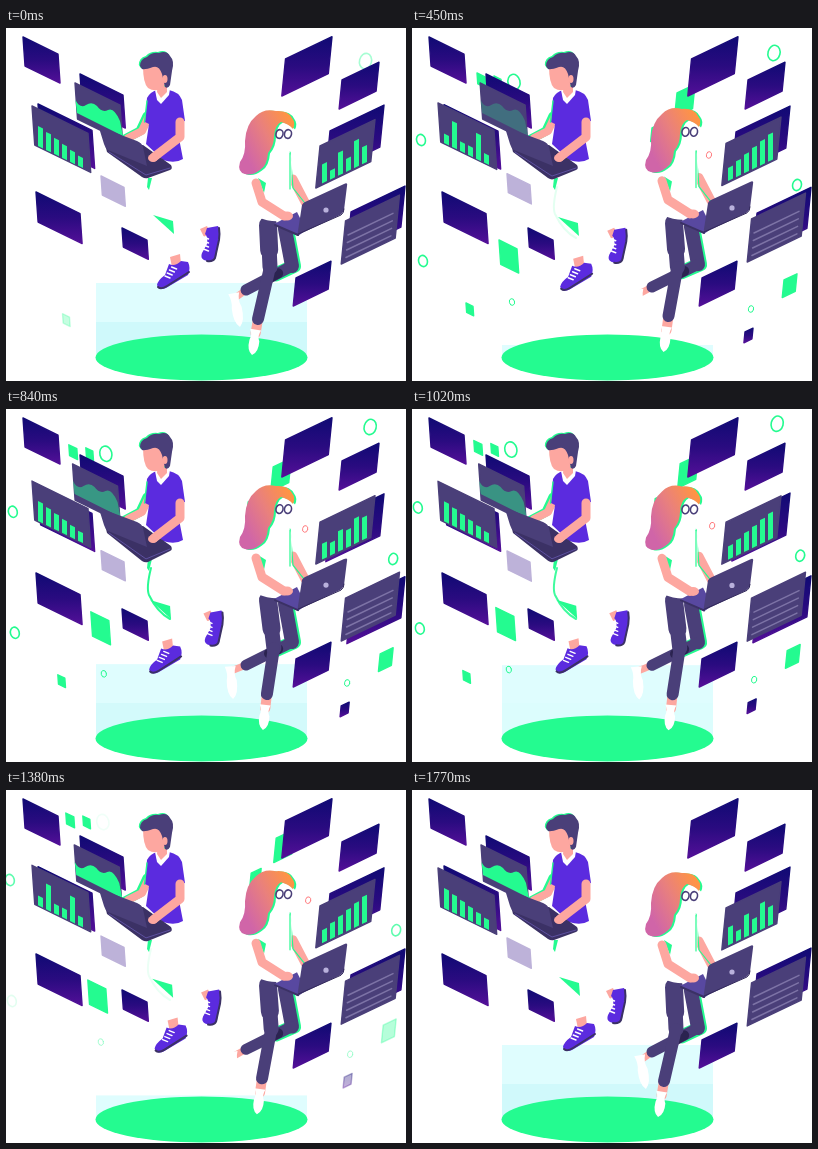
Write an HTML page with a canvas that moves like this. It is 400 by 353 pixels and loops after 1.8 s.

```html
<!DOCTYPE html>
<html lang="en">
<head>
<meta charset="utf-8">
<title>Floating work</title>
<style>
  html, body { margin: 0; width: 100%; height: 100%; overflow: hidden; background: #fff; }
  canvas { display: block; }
</style>
</head>
<body>
<canvas id="stage" width="400" height="353"></canvas>
<script>
const ctx = document.getElementById('stage').getContext('2d');
const LOOP = 1800, STEP = 30;
const GREEN = '#24fb90', SLATE = '#4a3f79', DARK = '#3b3165', VIOLET = '#5b2bdf',
      SKIN = '#fda7a0', WHITE = '#fff', INDIGO = 'indigo';

// sway rises and falls once per loop; lift and surge do so more and more sharply
let t = 0, sway = 0, lift = 0, surge = 0;

const cycle = sign => (1 + sign * Math.cos(4 * Math.PI * t / LOOP)) / 2;
const clamp = v => Math.max(0, Math.min(1, v));
const mix = (a, b, p) => a + (b - a) * p;
const between = (a, b, p) => a.map((v, i) => mix(v, b[i], p));
const isLeft = x => x < 200;
const slopeAt = x => isLeft(x) ? .49 : -.48;

function at(x, y, draw) {
  ctx.save();
  ctx.translate(x, y);
  draw();
  ctx.restore();
}
function faded(alpha, draw) {
  ctx.save();
  ctx.globalAlpha = alpha;
  draw();
  ctx.restore();
}
function shape(d, fill, x = 0, y = 0) {
  at(x, y, () => { ctx.fillStyle = fill; ctx.fill(new Path2D(d)); });
}
function line(d, color, width) {
  ctx.strokeStyle = color;
  ctx.lineWidth = width;
  ctx.stroke(new Path2D(d));
}
function limb(color, width, ...pts) {
  line('M' + pts.map(p => p.join(' ')).join('L'), color, width);
}
function ellipse(x, y, rx, ry, fill) {
  ctx.beginPath();
  ctx.ellipse(x, y, rx, ry, 0, 0, 7);
  ctx.fillStyle = fill;
  ctx.fill();
}
function ring(x, y, r, ratio, tilt, color, width) {
  ctx.beginPath();
  ctx.ellipse(x, y, r, r * ratio, tilt, 0, 7);
  ctx.strokeStyle = color;
  ctx.lineWidth = width;
  ctx.stroke();
}

// Sheared card that faces the middle of the stage
function card(x, y, w, h, fill = INDIGO) {
  const dy = w * slopeAt(x), skew = h * (isLeft(x) ? .07 : -.1);
  if (fill === INDIGO) {
    fill = ctx.createLinearGradient(x, y + Math.min(0, dy), x, y + h + Math.max(0, dy));
    fill.addColorStop(0, '#100a74');
    fill.addColorStop(.5, '#2a0b80');
    fill.addColorStop(1, '#530f98');
  }
  const path = new Path2D(`M${x} ${y}l${w} ${dy}l${skew} ${h}l${-w} ${-dy}z`);
  ctx.fillStyle = ctx.strokeStyle = fill;
  ctx.lineWidth = 1.4;
  ctx.fill(path);
  ctx.stroke(path);
}

function bars(x, y, height) {
  const slope = slopeAt(x);
  for (let i = 0; i < 6; i++)
    shape(`M${x + i * 8} ${y + i * 8 * slope}v${-height(i)}l5 ${5 * slope}v${height(i)}z`, GREEN);
}

// Confetti floats up and outwards; each piece lives for the same time
function drift(x, y, start, draw) {
  const p = (t - 450) / 720, side = isLeft(x) ? -1 : 1;
  const alpha = clamp((t - start) / 150) * clamp((start + 1380 - t) / 150);
  faded(alpha, () => draw(x + side * 4 * p, y - (15 - side * 2) * p));
}
function tile(x, y, w, start, fill = GREEN) {
  drift(x, y, start, (px, py) => card(px, py, w, w * 1.35, fill));
}
function bubble(x, y, r, start, color = GREEN) {
  drift(x, y, start, (px, py) =>
    ring(px, py, r, 1.3, isLeft(x) ? -.25 : .25, color, r > 3 ? 1.6 : 1));
}
function confetti() {
  tile(54, 275, 7, -40);
  tile(372, 252, 13, 50);
  tile(333, 304, 8, 50, INDIGO);
  tile(87, 212, 18, 260);
  tile(65, 45, 8, 260);
  tile(82, 48, 7, 260);
  tile(265, 65, 18, 260);
  tile(240, 100, 10, 260);
  bubble(362, 25, 6, -60);
  bubble(102, 54, 6, 10);
  bubble(9, 112, 4.4, 110);
  bubble(11, 233, 4.4, 20);
  bubble(100, 274, 2.6, 60);
  bubble(385, 157, 4.4, 110);
  bubble(297, 127, 2.6, 250, '#ff7d80');
  bubble(339, 281, 2.6, 60);
}

function leftCards() {
  card(17, 9, 35, 29);
  card(74, 46, 43, 33);
  at(68 - 2.5 * lift, 55, () => {
    card(1, 0, 45, 36, SLATE);
    const dim = t > 90 && t < 1270;
    faded(dim ? .22 + .26 * surge : 1, () =>
      shape('M1.5 17Q6 26 12 22T23 23Q28 30 34 27T46 38L49 53L3 30Z', GREEN));
  });
  card(32, 76 + 2 * lift, 54, 38);
  const y = 78 - 6 * sway;
  card(26, y, 56, 39, SLATE);
  bars(32, y + 40, i =>
    mix(20 - 2 * i, 15 + 11 * Math.cos((i - 1) * Math.PI * 2 / 3), cycle(-1) ** 3));
  card(30, 164, 44, 30);
  card(116, 200, 25, 19);
  card(95, 148 - 6.5 * lift, 23, 19, '#bdb2d9');
}

function rightCards() {
  card(279.5, 31, 46.5, 37);
  card(336, 52, 37, 29);
  card(324, 103 + 8 * surge, 54, 42);
  let y = 118 - 5 * sway;
  card(314, y, 55, 42, SLATE);
  bars(316, y + 37.5, i =>
    mix(13 + 2.8 * i, 13 + 2 * i + 6 * Math.cos(i * Math.PI), cycle(1) ** 18));
  card(345, 184 + 10 * surge, 54, 41);
  y = 193 - 4 * sway;
  card(339.5, y, 54, 43, SLATE);
  for (let i = 0; i < 4; i++)
    line(`M${342 - i * .7} ${y + 14 + i * 7.5}l45 -21.6`, '#7d73a6', 1.5);
  card(290, 250, 35, 28);
}

function platform() {
  const dip = 1 - Math.abs(t % 900 - 450) / 450;
  const top = 255 + 62 * dip ** 3;
  ctx.fillStyle = '#dffdfe';
  ctx.fillRect(90, top, 211, 326 - top);
  faded(cycle(1) ** 8, () => {
    ctx.fillStyle = '#cff9fb';
    ctx.fillRect(90, 294, 211, 32);
  });
  ellipse(195.5, 329.5, 106, 23, GREEN);
}

function shoes() {
  at(-8 * lift, 3.5 * sway, () => {
    shape('M164 229L174 226 175 236 166 239Z', SKIN);
    shape('M163 236Q169 239 175 233L182 234Q185 240 182 247L160 260Q153 263 151 257Q152 252 159 247Z', VIOLET);
    line('M152 259Q155 262 161 258L183 244', DARK, 2);
    for (let i = 0; i < 4; i++) line(`M${159 + i * 2.2} ${248 - i * 3}l5 2`, WHITE, 1.4);
  });
  at(3.5 * lift, 3.5 * sway, () => {
    shape('M194 201L201 198 204 205 198 209Z', SKIN);
    shape('M201 200L212 198Q215 203 213 210L210 229Q207 236 198 232Q194 230 196 225L201 216Q202 208 199 206Z', VIOLET);
    line('M213 200Q214 206 213 212L209 230Q207 234 201 233', DARK, 2);
    for (let i = 0; i < 4; i++) line(`M197.5 ${209 + i * 4}l5 2`, WHITE, 1.4);
  });
}

const manHair = 'M134 38Q134 31 141 29Q146 24 153 25Q161 22 164 28Q169 33 166 43L164 57Q162 61 159 59L156 46Q153 37 147 39Q139 42 136 41Z';
function man() {
  shape('M142 150L146 150 143 162 141 159Z', GREEN);
  faded(surge, () => line('M145 159Q140 179 143 186Q151 203 164 210', GREEN, 2));
  shape('M147 187L167 193 168 206Z', GREEN, -3 * lift, 4 * sway);
  shoes();

  limb(GREEN, 9, [141, 88], [134, 103], [119, 111]);
  limb(SKIN, 8, [143, 88], [136, 103], [122, 110]);
  shape('M141 70Q144 64 151 62L163 62Q173 64 176 72L179 93 170 95 177 131Q169 136 157 132L140 116 143 96 139 94Z', VIOLET);
  line('M141 73L138.500 94', GREEN, 1.4);
  shape('M149 62L164 61 163 67 155 76 151 72Z', WHITE);
  shape('M152 54L161 52 161 64 155 70 151 64Z', SKIN);

  shape(manHair, GREEN, -1.2, -1);
  shape('M137 38Q137 55 142 60Q148 64 155 61Q161 57 161 48L156 35Z', SKIN);
  shape(manHair, SLATE);
  ellipse(159, 51, 2.5, 4, SKIN);

  const y = 150 + 3 * lift;
  shape(`M100 120L137 117 165 137Q167 141 164 142L142 ${y}Q139 ${y + 1} 136 ${y - 1}L101 124Z`, DARK);
  line(`M103 124L140 ${y - 3}L164 140`, '#5d50a0', 1);
  shape('M94 103Q95 100 99 101L131 113Q136 115 137 119L141 138 102 122Q99 120 98 116Z', SLATE);
  limb(SKIN, 9, [174, 94], [174, 109], [148, 129]);
  ellipse(147, 130, 5, 4, SKIN);
}

function foot(ankle, heel, toe, width) {
  limb(SKIN, width, ankle, heel);
  const dx = toe[0] - heel[0], dy = toe[1] - heel[1];
  at(...heel, () => {
    ctx.rotate(Math.atan2(dy, dx));
    ctx.scale(Math.hypot(dx, dy) / 30, 1);
    shape('M-5 -5Q3 -2 10 -5Q25 -6 30 0Q25 6 10 5Q3 3 -5 6Z', WHITE);
  });
}

function legs() {
  const hip = [262, 197 - 6 * lift], knee = [264 + 4 * lift, 239];
  const ankle = [252 + 9 * sway, 291 - 6 * sway], toe = [246 + 11 * sway, 327 - 6 * sway];
  const backHip = [279, hip[1] + 4], backKnee = [286, 238 - 5 * lift];
  const backAnkle = [240, 262 - 6 * sway];
  foot(backAnkle, [229 - 4 * sway, 270 - 8 * sway], [234 - 7 * sway, 299 - 9 * sway], 7);
  limb(GREEN, 14, [281, backHip[1]], [288, backKnee[1]], between(backKnee, backAnkle, .35));
  limb(SLATE, 14, backHip, backKnee);
  limb(SLATE, 11, backKnee, backAnkle);
  limb('#2b2350', 10, between(backKnee, backAnkle, .3), between(backKnee, backAnkle, .5));
  foot(ankle, between(ankle, toe, .4), toe, 10);
  limb(SLATE, 18, hip, between(hip, knee, .6));
  limb(SLATE, 15, hip, knee);
  limb(SLATE, 12, knee, ankle);
}

const womanHair = 'M250 88Q258 80 270 83Q282 82 286 90Q290 95 287 101Q283 96 275 94Q269 97 268 108Q268 118 262 125Q261 138 254 142Q246 148 239 146Q231 144 234 134Q240 126 239 113Q240 96 250 88Z';
function woman() {
  legs();
  at(0, -4 * lift, () => {
    limb(SKIN, 9, [287, 151], [299, 174], [306, 182]);
    line('M284 124L287 160L302 179', GREEN, 1.2);
    shape('M250 136Q256 122 266 119L279 119Q286 124 286 134L285 160 288 190Q270 197 251 189L253 164 246 154Z', WHITE);
    shape('M252 150L260 155 258 165Z', GREEN);
    line('M284 125L284 161', GREEN, 1.2);
  });
  at(0, -6 * lift, () => {
    shape('M267 97Q276 91 286 97L286 109Q285 119 278 119Q268 118 266 108Z', WHITE);
    shape(womanHair, GREEN, 2, .5);
    const dye = ctx.createLinearGradient(238, 125, 288, 98);
    dye.addColorStop(0, '#d065a8');
    dye.addColorStop(.5, '#e9807d');
    dye.addColorStop(1, '#ff9444');
    shape(womanHair, dye);
    for (const x of [273.5, 282]) ring(x, 106, 3.5, 1.25, .2, SLATE, 1.6);
  });
  at(0, -6 * lift, () => {
    shape('M268 196L291 184 300 202 292 208Z', '#5848a0');
    line('M269 197L292 207', DARK, 2);
    shape('M296 177Q297 175 299 174L338 156Q342 154 341 158L338 182Q337 185 334 187L294 206Q291 207 292 203Z', SLATE);
    line('M292 206L335 187Q338 185 338 181', '#33295c', 1);
    ellipse(320, 182, 2.6, 2.6, '#b9b1dc');
    limb(SKIN, 9, [250, 155], [256, 174], [278, 188]);
    ellipse(281, 188, 6, 4.5, SKIN);
  });
}

function frame(now) {
  t = Math.floor(now % LOOP / STEP) * STEP;
  sway = (1 - Math.cos(2 * Math.PI * t / LOOP)) / 2;
  lift = sway ** 1.5;
  surge = sway ** 3;
  ctx.fillStyle = WHITE;
  ctx.fillRect(0, 0, 400, 353);
  ctx.lineCap = ctx.lineJoin = 'round';
  platform();
  confetti();
  leftCards();
  rightCards();
  man();
  woman();
  requestAnimationFrame(frame);
}
frame(performance.now());
</script>
</body>
</html>
```
